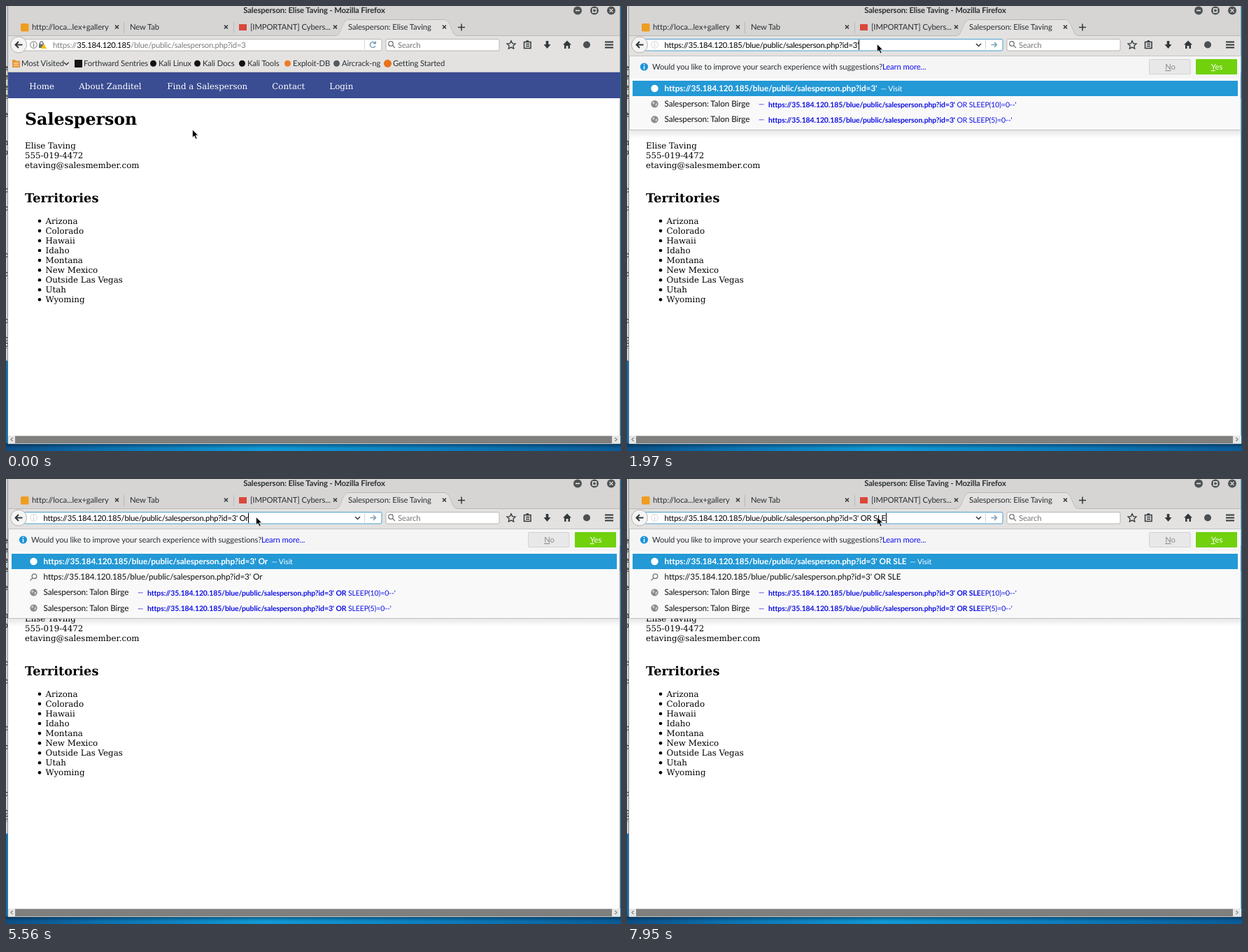
Write an HTML page that moves like this. It is 879 by 637 pixels and loops after 8 s.

```html
<!DOCTYPE html>
<html lang="en">
<head>
<meta charset="utf-8">
<title>Salesperson page</title>
<style>
  html, body { margin: 0; width: 100%; height: 100%; overflow: hidden; background: #fff; }
  svg { position: absolute; left: 0; top: 0; display: block; }
  text { white-space: pre; text-rendering: geometricPrecision; }
  .ui { font: 11.3px Lato, "Open Sans", sans-serif; letter-spacing: -.12px; fill: #2b2f31; }
  .bold { font-weight: 700; }
  .addr { letter-spacing: -.23px; fill: #000; }
  .row { font-size: 11.8px; fill: #111; }
  .link { font-size: 10.5px; fill: #1010e4; }
  .page { font: 11.85px "DejaVu Serif", serif; fill: #000; }
  .nav { fill: #fff; }
  .h1 { font-size: 23.7px; font-weight: 700; }
  .h2 { font-size: 17.77px; font-weight: 700; }
  .line { fill: none; stroke: #33383a; stroke-width: 1.5; }
  .thin { stroke-width: 1; }
</style>
</head>
<body>
<svg width="879" height="637" viewBox="0 0 879 637">
  <defs>
    <linearGradient id="desk">
      <stop offset="0" stop-color="#0b4f86"/><stop offset=".15" stop-color="#0c6fae"/>
      <stop offset=".42" stop-color="#119ad6"/><stop offset=".7" stop-color="#0d7dbd"/>
      <stop offset="1" stop-color="#0a5c98"/>
    </linearGradient>
    <linearGradient id="dim" x2="0" y2="1">
      <stop offset="0" stop-color="#012" stop-opacity=".5"/><stop offset="1" stop-color="#012" stop-opacity="0"/>
    </linearGradient>
    <linearGradient id="fade" x2="0" y2="1">
      <stop offset="0" stop-color="#000" stop-opacity=".1"/><stop offset="1" stop-color="#000" stop-opacity="0"/>
    </linearGradient>
    <clipPath id="edge"><rect width="3" height="490"/></clipPath>
    <g id="globe">
      <circle r="5.2"/>
      <path d="M-3.5-2.5L-.5-3.5L0-1L-2.5 1ZM1 0L3.5-1.5L3.5 2L1 3Z" fill="#fff" fill-opacity=".55"/>
    </g>
    <g id="glass" fill="none" stroke-width="1.3">
      <circle cx="1" cy="-1" r="3.3"/><path d="M-1.5 1.5L-5 5"/>
    </g>
    <path id="cross" class="line" d="M-2.5-2.5L2.5 2.5M2.5-2.5L-2.5 2.5"/>
  </defs>

  <!-- desktop and the window behind -->
  <rect width="879" height="637" fill="#0b70b0"/>
  <rect y="626" width="879" height="11" fill="url(#desk)"/>
  <rect y="626" width="879" height="7" fill="url(#dim)"/>
  <rect width="3" height="508" fill="#d2d2d1"/>
  <path d="M0 490H3M0 507.5H3" stroke="#999"/>
  <g id="scraps" class="page" clip-path="url(#edge)"></g>

  <!-- window frame -->
  <rect x="3" width="875" height="627" fill="#fff"/>
  <rect x="3" width="875" height="95" fill="#d6d5d4"/>
  <rect x="3" y="42" width="875" height="53" fill="#e3e2e1"/>
  <path d="M3 42.5H470C481 42.5 479 19.5 490 19.5H626C637 19.5 635 42.5 646 42.5H878" fill="none" stroke="#b9b7b5"/>
  <path d="M470 43.5C481 43.5 479 20 490 20H626C637 20 635 43.5 646 43.5Z" fill="#e3e2e1"/>
  <path d="M168.5 23V39M325.5 23V39" stroke="#bbb9b7"/>
  <path d="M3 94.5H878" stroke="#c6c4c2"/>
  <path d="M2.5 0V627M877.5 0V627M3 626.5H878" stroke="#6f7a80" stroke-opacity=".7"/>
  <text class="ui bold" x="440.5" y="10.3" text-anchor="middle">Salesperson: Elise Taving - Mozilla Firefox</text>
  <g fill="#505354">
    <circle cx="817" cy="6.5" r="6"/><circle cx="841" cy="6.5" r="6"/><circle cx="865" cy="6.5" r="6"/>
  </g>
  <path d="M814 6.5H820M838.5 4H843.5V9H838.5ZM862.6 4.1L867.4 8.9M867.4 4.1L862.6 8.9" fill="none" stroke="#eee" stroke-width="1.3"/>

  <!-- tabs -->
  <rect x="21" y="25" width="11.5" height="11.5" rx="1.5" fill="#ef9d1f"/>
  <rect x="333" y="26" width="11" height="9" fill="#d9483b"/>
  <g class="ui">
    <text x="37" y="34">http://loca...lex+gallery</text>
    <text x="177" y="34">New Tab</text>
    <text x="349" y="34">[IMPORTANT] Cybers...</text>
    <text x="489" y="34">Salesperson: Elise Taving</text>
  </g>
  <use href="#cross" x="158.5" y="30"/><use href="#cross" x="314.5" y="30"/>
  <use href="#cross" x="470.5" y="30"/><use href="#cross" x="626.5" y="30"/>
  <path class="line" d="M646 30.5H656M651 25.5V35.5"/>

  <!-- toolbar -->
  <rect id="field" x="24.5" y="47.5" width="512.5" height="16.5" rx="2" fill="#fff"/>
  <circle cx="18" cy="55.5" r="11.5" fill="#f4f4f3" stroke="#b4b2b0"/>
  <path class="line" stroke-width="2" d="M23.5 55.5H13.5M18 51L13.5 55.5L18 60" style="stroke-width:2"/>
  <g id="info">
    <circle cx="39.5" cy="55.5" r="4.8" fill="none" stroke="#6d7173"/>
    <path d="M39.5 54.5V58.5M39.5 52.3V53.5" stroke="#6d7173" stroke-width="1.2"/>
  </g>
  <g id="lock">
    <path class="line thin" d="M48.5 55V53A2.2 2.2 0 0 1 53 53V55"/>
    <rect x="47" y="54.5" width="7.5" height="5.5" fill="#6d7173"/>
    <path d="M54 54L58.2 61H49.8Z" fill="#f4c20d"/>
  </g>
  <text id="addr" class="ui addr" y="59.5"></text>
  <path id="caret" d="M0 48.5V63" stroke="#000"/>
  <path id="drop" class="line" d="M499 54L502.5 57.5L506 54"/>
  <path d="M512.5 49V62" stroke="#d2d2d2"/>
  <path id="reload" fill="none" stroke="#7d9db5" stroke-width="1.4" d="M527.5 53A4 4 0 1 0 528 57M528.3 50.5V53.8H525"/>
  <path id="go" fill="none" stroke="#7d9db5" stroke-width="1.5" d="M520.5 55.5H528.5M525 52L528.5 55.5L525 59"/>
  <rect x="543" y="47.5" width="162" height="16.5" rx="2" fill="#fff" stroke="#b8b6b4"/>
  <use href="#glass" transform="translate(551 55) scale(-1 1)" stroke="#777"/>
  <text class="ui" x="560" y="59.5" style="fill:#77797a">Search</text>
  <path class="line thin" style="stroke-width:1.3" d="M722 49.8L723.8 53.6L728 54.1L724.9 57L725.7 61.1L722 59.1L718.3 61.1L719.1 57L716 54.1L720.2 53.6Z"/>
  <path class="line" d="M740.5 51.5H750V60.5H740.5ZM743 54.5H748M743 57.5H748M743.5 50H747"/>
  <path d="M771.7 50H775.3V55H778.5L773.5 61L768.5 55H771.7Z" fill="#33383a"/>
  <path d="M802 49.5L808 55.5H806V61H803.5V57H800.5V61H798V55.5H796Z" fill="#33383a"/>
  <circle cx="830" cy="55.5" r="5" fill="#4b4f51"/>
  <path class="line" style="stroke-width:2" d="M856 51.5H868M856 55.5H868M856 59.5H868"/>

  <!-- bookmarks -->
  <path d="M9 77H13L14 78.5H20V88H9Z" fill="#e5983a"/>
  <path d="M11 82H18M11 85H18" stroke="#fff2dc"/>
  <text class="ui" x="22" y="86.3">Most Visited</text>
  <path class="line" d="M83 80.7L86.3 84L89.6 80.7"/>
  <g id="marks" class="ui"></g>

  <!-- web page -->
  <rect x="3" y="95" width="875" height="37" fill="#3a4c92"/>
  <g class="page">
    <g id="menu"></g>
    <text class="h1" x="27" y="170.3">Salesperson</text>
    <text x="27" y="204">Elise Taving</text>
    <text x="27" y="218">555-019-4472</text>
    <text x="27" y="232">etaving@salesmember.com</text>
    <text class="h2" x="27" y="281">Territories</text>
    <g id="list"></g>
  </g>
  <rect x="3" y="615" width="875" height="11.5" fill="#e6e6e5"/>
  <rect x="13" y="615.5" width="853" height="10.5" fill="#7f7f7e"/>
  <path class="line thin" d="M9.5 618L7 620.5L9.5 623M870.5 618L873 620.5L870.5 623"/>

  <!-- suggestions -->
  <g id="popup">
    <rect id="shade" x="4" width="873" height="12" fill="url(#fade)"/>
    <rect id="panel" x="3.5" y="71.5" width="873.5" fill="#f9f9fa" stroke="#c3c3c3"/>
    <rect x="4" y="72" width="873" height="31" fill="#f5f5f6"/>
    <circle cx="24.5" cy="87" r="5.6" fill="#1d94d8"/>
    <path d="M24.5 86V90.5M24.5 83.2V84.8" stroke="#fff" stroke-width="1.5"/>
    <g class="ui">
      <text x="36" y="91">Would you like to improve your search experience with suggestions?</text>
      <text x="365" y="91" style="fill:#0c0cee">Learn more...</text>
      <rect x="746.5" y="76.5" width="58.5" height="21" rx="1" fill="#e8e8e8" stroke="#d2d2d2"/>
      <text x="776.5" y="91" text-anchor="middle" style="fill:#8b8b8b"><tspan text-decoration="underline">N</tspan>o</text>
      <rect x="813" y="76" width="59" height="22" rx="1" fill="#70d10c"/>
      <text x="843" y="91" text-anchor="middle" style="fill:#fff"><tspan text-decoration="underline">Y</tspan>es</text>
    </g>
    <rect x="8" y="107" width="865" height="22" fill="#2399d6"/>
    <g id="rows" class="ui"></g>
  </g>

  <path id="arrow" d="M0 0V11.3L2.6 8.9L4.6 13.5L6.6 12.6L4.6 8.2H8.2Z" fill="#000" stroke="#fff" stroke-width=".7"/>
  <path id="beam" d="M-2.5 .5H-.8L0 1.2L.8 .5H2.5M0 1V13M-2.5 13.5H-.8L0 12.8L.8 13.5H2.5" fill="none" stroke="#000"/>
</svg>
<script>
const $ = id => document.getElementById(id);
const show = (id, on) => $(id).style.display = on ? '' : 'none';
const text = (x, y, s, cls = '') => `<text class="${cls}" x="${x}" y="${y}">${s}</text>`;
const bold = s => `<tspan class="bold">${s}</tspan>`;

const HOST = '35.184.120.185';
const PATH = '/blue/public/salesperson.php?id=3';
const URL_TEXT = 'https://' + HOST + PATH;

$('scraps').innerHTML = [...'eeeeenoccccccc'].map((c, i) =>
  text(-4, [92, 105, 120, 133, 159, 199, 213, 267, 293, 360, 387, 454, 480, 488][i], c)).join('');

$('menu').innerHTML = [['Home', 33], ['About Zanditel', 104], ['Find a Salesperson', 230], ['Contact', 380], ['Login', 462]]
  .map(([s, x]) => text(x + .3, 118.6, s, 'nav')).join('');

$('list').innerHTML = ['Arizona', 'Colorado', 'Hawaii', 'Idaho', 'Montana', 'New Mexico', 'Outside Las Vegas', 'Utah', 'Wyoming']
  .map((s, i) => {
    const y = 311.7 + i * 14.07;
    return `<circle cx="48" cy="${y - 3.9}" r="2.3"/>` + text(56.5, y, s);
  }).join('');

$('marks').innerHTML = [
  ['Forthward Sentries', 111, '#151515', 0], ['Kali Linux', 218, '#111', 5], ['Kali Docs', 281, '#111', 5],
  ['Kali Tools', 345, '#111', 5], ['Exploit-DB', 410, '#ee7a25', 5], ['Aircrack-ng', 480, '#555a60', 5],
  ['Getting Started', 553, '#e8701a', 6]
].map(([s, x, fill, r]) => {
  const icon = r ? `<circle cx="${x - 7.5}" cy="82.3" r="${r - .5}" fill="${fill}"/>`
                 : `<rect x="${x - 13}" y="77" width="11" height="11" fill="${fill}"/>`;
  return icon + text(x, 86.3, s);
}).join('');

// Each step changes only the listed parts of the state.
const steps = [
  [0, { ptr: 'arrow', x: 266.5, y: 177, drop: 0, focus: 0, edit: 0, caret: 0, typed: '', popup: null, search: 0 }],
  [150, { x: 375.5, y: 68 }],
  [320, { ptr: 'beam', x: 364, y: 43, drop: 1 }],
  [470, { x: 360, y: 45 }],
  [620, { x: 357, y: 48 }],
  [770, { focus: 1, caret: 1 }],
  [1670, { ptr: 'arrow', x: 357.5, y: 54.5 }],
  [1820, { edit: 1, typed: "'" }],
  [1970, { popup: '' }],
  [2870, { caret: 0 }],
  [4210, { caret: 1 }],
  [4510, { typed: "' ", search: 1 }],
  [5410, { typed: "' O", popup: 'O' }],
  [5560, { typed: "' Or", popup: 'Or' }],
  [6160, { typed: "' O", caret: 0 }],
  [6310, { caret: 1, popup: 'O' }],
  [6460, { typed: "' ", popup: '' }],
  [6610, { typed: "' O" }],
  [6750, { popup: 'O' }],
  [7050, { typed: "' OR", popup: 'OR' }],
  [7500, { typed: "' OR " }],
  [7650, { typed: "' OR SL", popup: 'OR S' }],
  [7800, { popup: 'OR SL' }],
  [7950, { typed: "' OR SLE", popup: 'OR SLE' }]
];

const globe = (y, fill) => `<use href="#globe" x="39.5" y="${y}" fill="${fill}"/>`;

function historyRow(y, secs, query) {
  const words = query.split(' ').filter(Boolean).join('|');
  let title = 'Salesperson: Talon Birge';
  if (words) title = title.replace(new RegExp(words, 'gi'), bold);
  const tail = `OR SLEEP(${secs})=0--'`;
  const n = query.length;
  return globe(y, '#8b8b8b') + text(53.5, y + 4, title, 'row') + text(188, y + 4, '—', 'link')
    + text(202, y + 4.5, bold(URL_TEXT + "' " + tail.slice(0, n)) + tail.slice(n), 'link');
}

function drawPopup({ popup, search }) {
  const query = URL_TEXT + "'" + (popup && ' ' + popup);
  const bottom = search ? 199.5 : 177.5;
  $('panel').setAttribute('height', bottom - 71.5);
  $('shade').setAttribute('y', bottom);
  let y = 118;
  let html = globe(y, '#fff')
    + `<text class="row" x="53.5" y="122" style="fill:#fff;letter-spacing:-.06px">${bold(query)}`
    + `<tspan dx="5" font-size="10.5">— Visit</tspan></text>`;
  if (search) {
    y += 22.2;
    html += `<use href="#glass" x="39.5" y="${y}" stroke="#777"/>` + text(53.5, y + 4, query, 'row');
  }
  for (const secs of [10, 5]) html += historyRow(y += 22.2, secs, popup);
  $('rows').innerHTML = html;
}

function draw(s) {
  const addr = $('addr');
  const left = s.edit ? 53.5 : 67;
  const grey = t => `<tspan fill="#7b7d7e">${t}</tspan>`;
  addr.innerHTML = s.focus ? URL_TEXT + s.typed : grey('https://') + HOST + grey(PATH);
  addr.setAttribute('x', left);
  $('field').setAttribute('stroke', s.focus ? '#4d9fcf' : '#b8b6b4');
  $('info').setAttribute('opacity', s.edit ? .3 : 1);
  show('lock', !s.edit);
  show('reload', !s.edit);
  show('go', s.edit);
  show('drop', s.drop);
  show('caret', s.caret);
  const end = Math.round(left + addr.getComputedTextLength()) + .5;
  $('caret').setAttribute('transform', `translate(${end} 0)`);
  show('popup', s.popup !== null);
  if (s.popup !== null) drawPopup(s);
  show('arrow', s.ptr === 'arrow');
  show('beam', s.ptr === 'beam');
  $(s.ptr).setAttribute('transform', `translate(${s.x} ${s.y})`);
}

let last = -1;
function tick() {
  const t = performance.now() % 8000;
  const n = steps.filter(([at]) => at <= t).length;
  if (n !== last) {
    last = n;
    draw(Object.assign({}, ...steps.slice(0, n).map(step => step[1])));
  }
  requestAnimationFrame(tick);
}
tick();
</script>
</body>
</html>
```
